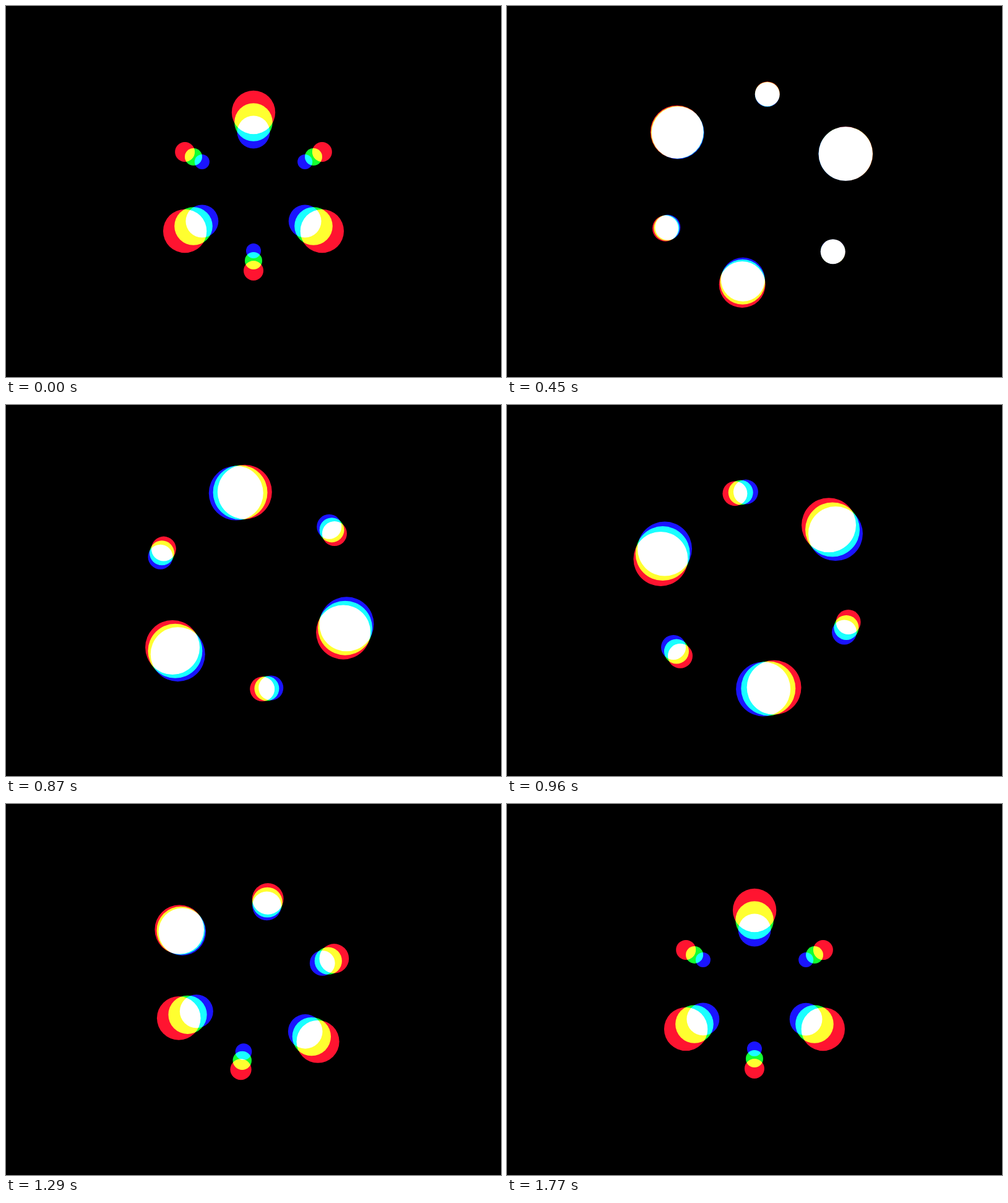
An HTML page with a canvas that plays this animation: 800x600 px, repeating every 1.8 s.

```html
<!DOCTYPE html>
<html lang="en">
<head>
<meta charset="utf-8">
<title>Six orbiting dots</title>
<style>
  html, body { margin: 0; width: 100%; height: 100%; overflow: hidden; background: #000; }
  canvas { display: block; }
</style>
</head>
<body>
<canvas id="stage" width="800" height="600"></canvas>
<script>
const ctx = document.getElementById("stage").getContext("2d");

const LOOP = 1800, STEP = 30;
const DOTS = 6, ORBIT = 160, SMALL = 20, LARGE = 44;
const STAGGER = 0.16;
const RAD = Math.PI / 180;

// Each layer shrinks to its own scale and turns with its own sharpness.
const LAYERS = [
  { color: "#ff1430", scale: 0.8, power: 12 },
  { color: "#14ff30", scale: 0.7, power: 14 },
  { color: "#1a14ff", scale: 0.6, power: 16 }
];

const mix = (a, b, k) => a + (b - a) * k;

function ease(u, power) {
  u = Math.min(1, Math.max(0, u));
  return u < 0.5
    ? 0.5 * Math.pow(2 * u, power)
    : 1 - 0.5 * Math.pow(2 - 2 * u, power);
}

function drawDot(layer, j, t) {
  const opening = t < 0.5;
  const u = (2 * t) % 1 + STAGGER * j / DOTS;
  const move = ease(u, 12);
  const swap = ease(u, 18);

  const open = opening ? move : 1 - move;
  const swapped = opening ? swap : 1 - swap;
  const big = j % 2 ? swapped : 1 - swapped;

  const scale = mix(layer.scale, 1, open);
  const sway = 7.5 * (1 - Math.cos(2 * Math.PI * t));
  const angle = (30 + 60 * j + sway + 120 * ease(t, layer.power)) * RAD;

  ctx.beginPath();
  ctx.arc(
    400 + ORBIT * scale * Math.cos(angle),
    300 + ORBIT * scale * Math.sin(angle),
    scale * mix(SMALL, LARGE, big), 0, 2 * Math.PI
  );
  ctx.fill();
}

function draw(t) {
  ctx.globalCompositeOperation = "source-over";
  ctx.fillStyle = "#000";
  ctx.fillRect(0, 0, 800, 600);
  ctx.globalCompositeOperation = "lighten";
  for (const layer of LAYERS) {
    ctx.fillStyle = layer.color;
    for (let j = 1; j <= DOTS; j++) drawDot(layer, j, t);
  }
}

let start = null;
function tick() {
  const now = performance.now();
  if (start === null) start = now;
  const ms = (now - start) % LOOP;
  draw(Math.floor(ms / STEP) * STEP / LOOP);
  requestAnimationFrame(tick);
}
tick();
</script>
</body>
</html>
```
